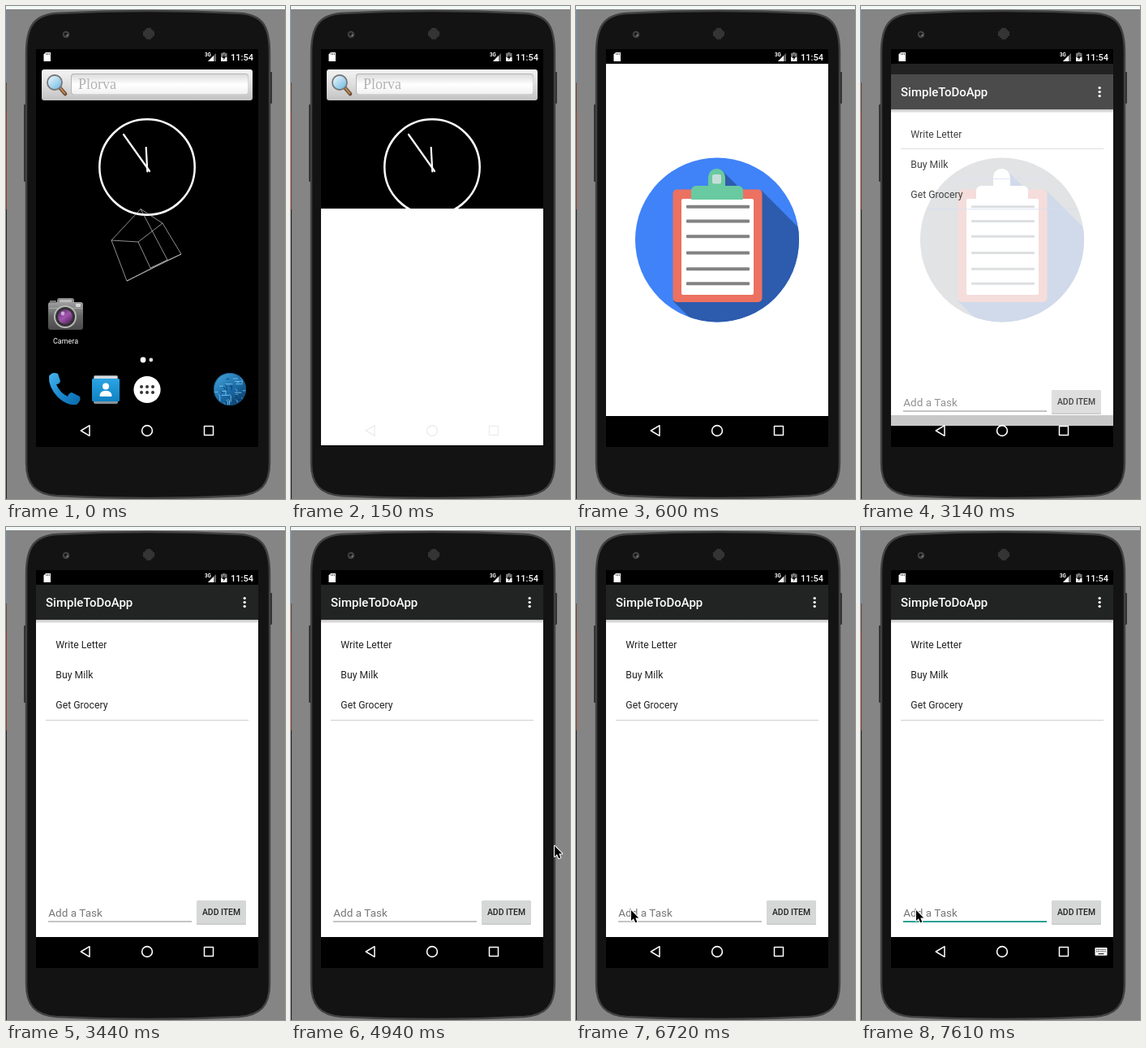
An HTML page with a canvas for the animation above (8000 ms loop, 344 by 606 pixels).

```html
<!DOCTYPE html>
<html lang="en">
<head>
<meta charset="utf-8">
<title>To-do app launch</title>
<style>
html, body { margin: 0; width: 100%; height: 100%; overflow: hidden; background: #858585; }
canvas { display: block; width: 344px; height: 606px; }
</style>
</head>
<body>
<canvas id="stage"></canvas>
<script>
const W = 344, H = 606, LOOP = 8000;
const SCREEN = { x: 37, y: 53, w: 274, h: 489 };
const TOP = 71, NAV = 504;
const canvas = document.getElementById('stage');
const ctx = canvas.getContext('2d');
const ratio = window.devicePixelRatio || 1;
canvas.width = W * ratio;
canvas.height = H * ratio;

// Pointer tip: time, x, y
const POINTER = [
  [4940, 325, 392], [5240, 170, 488], [5390, 168, 488], [5540, 121, 479],
  [5680, 101, 475], [5830, 94, 475], [5970, 93, 476], [6570, 78, 473], [6720, 68, 471]
];
const FULL = { disc: '#4083f8', shade: '#2d5bad', board: '#ec7160', clip: '#69c9a0', hole: '#c4ded9', line: '#828282', thick: 4 };
const PALE = { disc: '#e1e3e5', shade: '#d0daeb', board: '#f5dddb', clip: '#fff', hole: '#fff', line: '#dddfe1', thick: 3 };

function held(keys, t) {
  let found = null;
  for (const key of keys) if (t >= key[0]) found = key;
  return found;
}

function rect(x, y, w, h, fill) {
  ctx.fillStyle = fill;
  ctx.fillRect(x, y, w, h);
}

function round(x, y, w, h, r, fill) {
  ctx.beginPath();
  ctx.roundRect(x, y, w, h, r);
  ctx.fillStyle = fill;
  ctx.fill();
}

function dot(x, y, r, fill) {
  ctx.beginPath();
  ctx.arc(x, y, r, 0, Math.PI * 2);
  ctx.fillStyle = fill;
  ctx.fill();
}

function ring(x, y, r, color, width) {
  ctx.beginPath();
  ctx.arc(x, y, r, 0, Math.PI * 2);
  ctx.strokeStyle = color;
  ctx.lineWidth = width;
  ctx.stroke();
}

function trace(pts, closed) {
  ctx.beginPath();
  for (let i = 0; i < pts.length; i += 2) ctx.lineTo(pts[i], pts[i + 1]);
  if (closed) ctx.closePath();
}

function poly(pts, fill) {
  trace(pts, true);
  ctx.fillStyle = fill;
  ctx.fill();
}

function stroke(pts, color, width, closed) {
  trace(pts, closed);
  ctx.strokeStyle = color;
  ctx.lineWidth = width;
  ctx.stroke();
}

function label(str, x, y, size, color, weight = 400, align = 'left', family = 'Roboto, sans-serif') {
  ctx.font = `${weight} ${size}px ${family}`;
  ctx.textAlign = align;
  ctx.fillStyle = color;
  ctx.fillText(str, x, y);
}

function fade(x0, y0, x1, y1, ...colors) {
  const g = ctx.createLinearGradient(x0, y0, x1, y1);
  colors.forEach((c, i) => g.addColorStop(i / (colors.length - 1), c));
  return g;
}

function clipTo(x, y, w, h, draw) {
  ctx.save();
  ctx.beginPath();
  ctx.rect(x, y, w, h);
  ctx.clip();
  draw();
  ctx.restore();
}

function phonePath() {
  ctx.beginPath();
  ctx.moveTo(25, 58);
  ctx.bezierCurveTo(25, 26, 34, 11, 62, 9);
  ctx.quadraticCurveTo(175, 3, 289, 9);
  ctx.bezierCurveTo(317, 11, 325, 26, 325, 58);
  ctx.lineTo(325, 562);
  ctx.bezierCurveTo(325, 588, 314, 600, 288, 602);
  ctx.quadraticCurveTo(175, 608, 62, 602);
  ctx.bezierCurveTo(36, 600, 25, 588, 25, 562);
  ctx.closePath();
}

function drawPhone(t) {
  rect(0, 0, W, H, '#858585');
  rect(0, 0, W, 4, t < 6270 ? '#f2faf7' : '#d3d7d5');
  rect(0, 4, 1, 90, '#6d8fb5');
  rect(0, 94, 1, 36, '#70483f');
  rect(0, 130, 1, 120, '#93402d');
  rect(0, 250, 1, 356, '#282828');
  round(22, 121, 4, 95, 1, '#333');
  round(324, 81, 4, 39, 1, '#333');
  phonePath();
  ctx.fillStyle = '#131313';
  ctx.fill();
  ctx.strokeStyle = '#414141';
  ctx.lineWidth = 2.4;
  ctx.stroke();
  dot(74, 35, 4.2, '#454545');
  dot(73.5, 34.5, 2, '#191919');
  dot(75.5, 36, 1, '#8a8a8a');
  for (let i = -3; i <= 3; i++)
    for (let j = -3; j <= 3; j++)
      if (i * i + j * j < 12) dot(176 + i * 2, 34 + j * 2, 0.75, '#686868');
  rect(SCREEN.x, SCREEN.y, SCREEN.w, SCREEN.h, '#000');
}

function drawStatus() {
  poly([49, 57, 55, 57, 55, 68, 46.5, 68, 46.5, 59.5], '#fff');
  for (const x of [49.3, 51.2, 53.1]) rect(x, 58, 0.8, 2, '#333');
  label('3G', 245, 62, 6.3, '#fff', 700);
  poly([259, 58, 259, 68, 249, 68], '#666');
  poly([256, 61, 256, 68, 249, 68], '#fff');
  rect(267, 57, 3.5, 2, '#777');
  rect(265, 58, 7.5, 5, '#777');
  rect(265, 63, 7.5, 5, '#fff');
  poly([269.5, 59, 266.3, 64, 268.5, 64, 268, 67, 271.3, 62, 269, 62], '#111');
  label('11:54', 305, 66.5, 11, '#fff', 500, 'right');
}

function drawNav(color) {
  ctx.lineJoin = 'round';
  stroke([92.3, 522, 103, 515.7, 103, 528.3], color, 1.5, true);
  ring(174, 522, 6.4, color, 1.6);
  ctx.strokeStyle = color;
  ctx.lineWidth = 1.5;
  ctx.strokeRect(244.5, 516.5, 11, 11);
}

function drawKeyboardIcon() {
  round(288.5, 517, 15, 9.8, 1, '#fff');
  for (let i = 0; i < 5; i++) {
    rect(290.2 + i * 2.5, 518.8, 1.3, 1.3, '#222');
    rect(290.2 + i * 2.5, 521.2, 1.3, 1.3, '#222');
  }
  rect(292.5, 524, 7, 1.2, '#222');
}

function drawSearch() {
  round(44, 78, 260, 38, 3, fade(0, 78, 0, 116, '#f4f4f4', '#dedede', '#c2c2c2'));
  round(80, 83, 219, 26, 4, '#b5b5b5');
  round(81, 84, 217.5, 24.5, 3.5, fade(0, 84, 0, 109, '#dcdcdc', '#fff', '#f0f0f0'));
  ctx.lineCap = 'round';
  stroke([66, 100, 73, 108], '#6b4a32', 4.6);
  stroke([67, 101, 72.5, 107.3], '#c08a5a', 2);
  ctx.lineCap = 'butt';
  dot(60, 94, 9, fade(53, 86, 66, 102, '#eaf6fd', '#75bde4'));
  ring(60, 94, 9, '#777', 1.8);
  label('Plorva', 89, 102, 18, '#b2b2b2', 400, 'left', '"Liberation Serif", serif');
}

function drawClock() {
  ring(174, 198, 58.7, '#fff', 2.5);
  ctx.lineCap = 'round';
  stroke([145, 158, 177, 203], '#fff', 2.2);
  stroke([172.7, 174, 174.3, 203.5], '#fff', 2.2);
  ctx.lineCap = 'butt';
}

function drawCube() {
  const color = '#cfcfcf';
  stroke([130, 288, 166, 249.5, 193, 267, 163, 290], color, 0.7, true);
  stroke([130, 288, 149, 338, 216, 305, 193, 267], color, 0.7);
  stroke([163, 290, 178, 322, 216, 305], color, 0.7);
  stroke([166, 249.5, 199, 312, 149, 338], color, 0.7);
}

function drawCamera() {
  round(63, 359, 21, 14, 3, '#8b8b8b');
  round(66, 361, 15, 6, 1, '#bdbdbd');
  round(52, 364, 43, 34, 3, fade(0, 364, 0, 398, '#a0a0a0', '#656565', '#494949'));
  rect(53, 371, 41, 1, '#aaa');
  round(54, 362, 8, 3, 1, '#777');
  round(86, 366, 6, 4, 1, '#d5d5d5');
  dot(73, 382, 14, '#b7b7b7');
  dot(73, 382, 12, '#333');
  dot(73, 382, 9, fade(66, 374, 79, 390, '#5a3170', '#a255ae', '#54265f'));
  dot(70, 378, 2.4, '#cfa4dd');
  label('Camera', 73.5, 415, 9, '#fff', 400, 'center');
}

function drawDialer() {
  const blue = fade(52, 450, 92, 490, '#4bb7f0', '#1d8bd0', '#0b68a9');
  ctx.beginPath();
  ctx.moveTo(53, 455);
  ctx.quadraticCurveTo(57, 449, 64, 452);
  ctx.lineTo(67, 461);
  ctx.quadraticCurveTo(66, 465, 62, 465);
  ctx.quadraticCurveTo(66, 475, 76, 480);
  ctx.quadraticCurveTo(77, 476, 81, 475);
  ctx.lineTo(91, 480);
  ctx.quadraticCurveTo(93, 485, 87, 490);
  ctx.quadraticCurveTo(76, 492, 64, 481);
  ctx.quadraticCurveTo(52, 468, 53, 455);
  ctx.fillStyle = blue;
  ctx.fill();
}

function drawContacts() {
  round(108, 454, 30, 35, 2, '#8a9298');
  rect(109, 455, 28, 3, '#d7dce0');
  round(106, 458, 34, 28, 1.5, fade(0, 458, 0, 486, '#2ba4e4', '#0f82c4'));
  dot(123, 467.5, 4, '#fff');
  round(115.5, 473, 15, 7, [6, 6, 1, 1], '#fff');
}

function drawGlobe() {
  ctx.save();
  dot(276, 471, 20, fade(262, 455, 290, 490, '#3f9bd2', '#1b6ca9', '#0b3c66'));
  ctx.clip();
  let seed = 7;
  const rnd = () => (seed = seed * 16807 % 2147483647) / 2147483647;
  for (let i = 0; i < 34; i++) {
    const x = 257 + rnd() * 36, y = 453 + rnd() * 35, len = 3 + rnd() * 7;
    const color = rnd() < 0.75 ? '#7cc5ea' : '#0b3f6c';
    stroke(rnd() < 0.5 ? [x, y, x + len, y] : [x, y, x + 2, y + 2, x + 2, y + len], color, 0.9);
  }
  ctx.restore();
  ring(276, 471, 19.6, '#175a8c', 0.8);
}

function drawHome() {
  drawSearch();
  drawClock();
  drawCube();
  drawCamera();
  dot(169, 435, 3.4, '#fff');
  dot(178.8, 435, 2.4, '#ddd');
  drawDialer();
  drawContacts();
  dot(174, 471.5, 16.6, '#fff');
  for (const x of [167, 174, 181]) for (const y of [468, 475]) dot(x, y, 2, '#333');
  drawGlobe();
}

function drawClipboard(dy, tone) {
  ctx.save();
  ctx.translate(0, dy);
  ctx.save();
  dot(174, 287.5, 101, tone.disc);
  ctx.clip();
  poly([180, 202, 205, 227, 229, 227, 300, 298, 300, 410, 167, 410, 120, 363], tone.shade);
  ctx.restore();
  round(119.5, 225.5, 110, 138.5, 5, tone.board);
  round(130, 237, 89, 118, 2, '#fff');
  round(142, 221, 64, 17, [6, 6, 1, 1], tone.clip);
  round(163, 200, 21, 26, [10.5, 10.5, 0, 0], tone.clip);
  round(168, 207, 11, 11.5, 2, tone.hole);
  for (const y of [246.8, 264.4, 283.2, 303.6, 323.2, 341.2])
    round(136, y - tone.thick / 2, 78, tone.thick, 1, tone.line);
  ctx.restore();
}

function drawSplash(t) {
  const dy = t < 300 ? 178 : t < 450 ? 28 : 0;
  const top = TOP + dy, bottom = Math.min(NAV + dy, 540);
  clipTo(SCREEN.x, top, SCREEN.w, bottom - top, () => {
    rect(SCREEN.x, top, SCREEN.w, bottom - top, '#fff');
    if (t < 300) return;
    ctx.save();
    if (t >= 450 && t < 600) ctx.globalAlpha = 0.6;
    drawClipboard(dy, t < 450 ? PALE : FULL);
    ctx.restore();
  });
}

function drawToolbar(dy, color) {
  rect(SCREEN.x, TOP, SCREEN.w, dy, '#222');
  rect(SCREEN.x, TOP + dy, SCREEN.w, 43, color);
  rect(SCREEN.x, 114 + dy, SCREEN.w, 4, fade(0, 114 + dy, 0, 118 + dy, '#c0c0c0', '#efefef'));
  label('SimpleToDoApp', 49, 98 + dy, 15, '#fff', 500);
  for (const y of [87.6, 92.6, 97.6]) dot(294.2, y + dy, 1.7, '#fff');
}

function drawField(dy, t, entering) {
  label('Add a Task', 52.3, 479 + dy, 13.5, entering ? '#919191' : '#777');
  if (t < 7010) rect(52, 484.5 + dy, 177, 1, '#8b8b8b');
  else rect(52, 484.2, 177, 1.8, t < 7160 ? '#4f9c95' : '#159688');
  if (t >= 7160 && t < 7610) rect(52, 464, 1.6, 19, '#159688');
  round(235, 460 + dy, 61, 29, 1.5, '#c9c9c9');
  round(235, 459 + dy, 61, 28.5, 1.5, entering ? '#dedede' : '#d6d7d7');
  label('ADD ITEM', 265.5, 477.3 + dy, 10.4, entering ? '#444' : '#222', 500, 'center');
}

function drawTasks(t) {
  const entering = t < 3290;
  const dy = entering ? 13 : t < 3440 ? 1.5 : 0;
  rect(SCREEN.x, TOP, SCREEN.w, NAV - TOP, '#fff');
  if (entering) {
    drawClipboard(0, PALE);
    rect(49, 175, 250, 1, '#dedede');
    rect(110, 212, 120, 0.8, '#d9e2f2');
    rect(82, 249.5, 185, 0.8, '#d5dff0');
  } else {
    rect(49, 237 + dy, 250, 1, '#d0d0d0');
  }
  drawToolbar(dy, entering ? '#4b4b4b' : '#222423');
  ['Write Letter', 'Buy Milk', 'Get Grocery'].forEach((task, i) =>
    label(task, 61.3, 149 + i * 37.2 + dy, 12.25, entering ? '#404040' : '#222'));
  drawField(dy, t, entering);
  if (dy) rect(SCREEN.x, NAV - 1, SCREEN.w, dy, '#c8c8c8');
}

function drawPointer(x, y) {
  ctx.save();
  ctx.translate(x, y);
  ctx.lineJoin = 'round';
  const arrow = [0, 0, 0, 13, 3, 10.3, 5.2, 15.3, 7.4, 14.4, 5.3, 9.5, 9.3, 9.5];
  stroke(arrow, '#fff', 2, true);
  poly(arrow, '#000');
  ctx.restore();
}

function draw(t) {
  ctx.setTransform(ratio, 0, 0, ratio, 0, 0);
  drawPhone(t);
  drawStatus();
  if (t < 300) drawHome();
  if (t >= 150 && t < 3140) drawSplash(t);
  if (t >= 3140) drawTasks(t);
  drawNav(t >= 150 && t < 450 ? '#eee' : '#fff');
  if (t >= 7160) drawKeyboardIcon();
  const tip = held(POINTER, t);
  if (tip) drawPointer(tip[1], tip[2]);
}

function tick() {
  draw((performance.now() - start) % LOOP);
  requestAnimationFrame(tick);
}

const start = performance.now();
tick();
</script>
</body>
</html>
```
